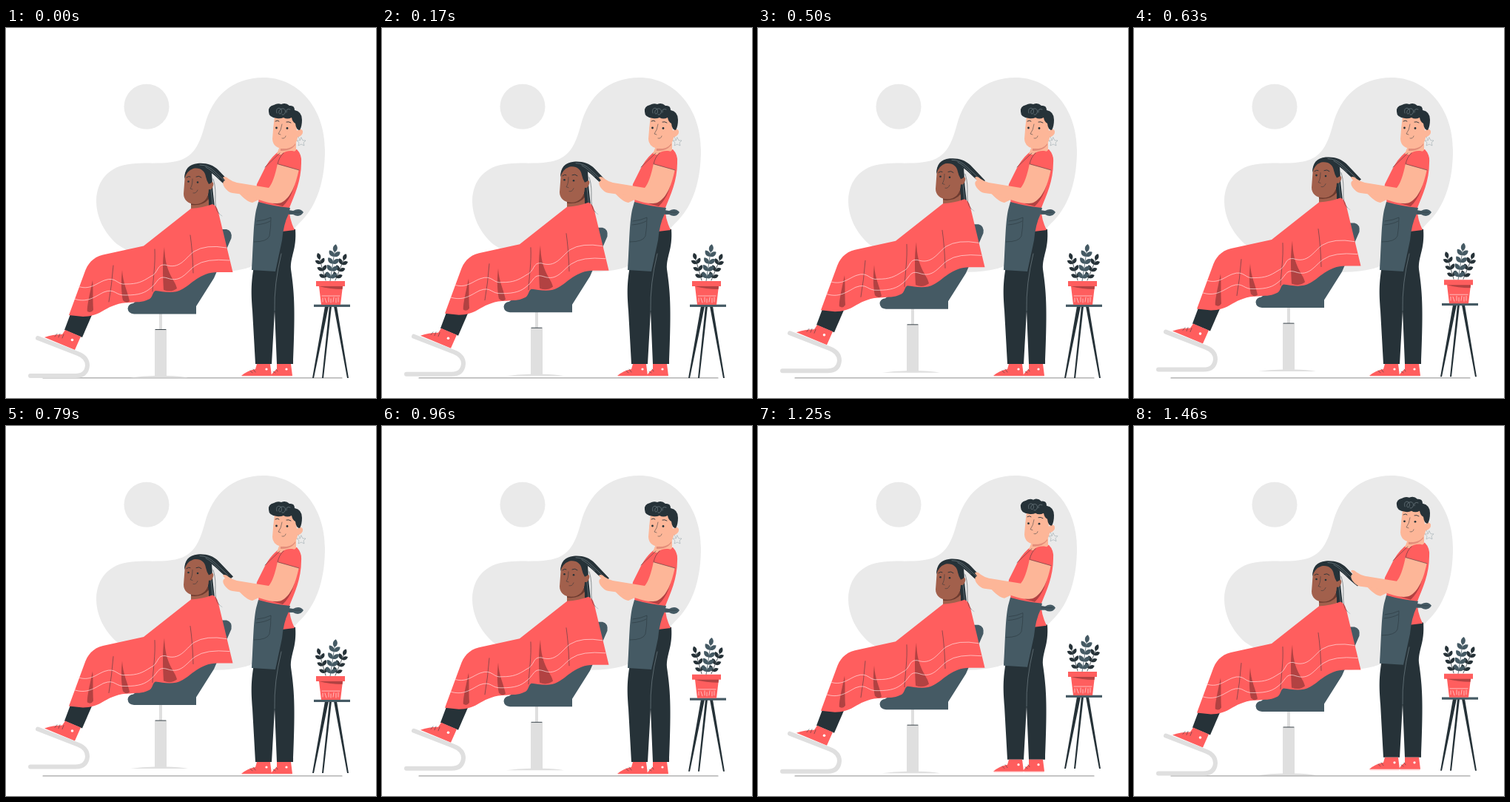
Animation, 500 px wide and 500 px high, one loop 1.5 s. Source, as an HTML page:

```html
<!DOCTYPE html>
<html lang="en">
<head>
<meta charset="utf-8">
<style>
html, body { margin: 0; width: 100%; height: 100%; overflow: hidden; background: #fff; }
svg { display: block; width: 100%; height: 100%; }
path { stroke-linecap: round; stroke-linejoin: round; }
.red { fill: #ff5e5e; }
.deep { fill: #b24242; }
.dark { fill: #263238; }
.slate { fill: #455a64; }
.skin { fill: #fdb698; }
.brown { fill: #a2604c; }
.pale { fill: #dfdfdf; }
.white { fill: #fff; }
.ink { fill: none; stroke: #263238; stroke-width: .9; }
.fine { fill: none; stroke: #263238; stroke-width: .5; }
.wave { fill: none; stroke: #ffe3e3; stroke-width: .7; }
.shine { fill: none; stroke: #91a0a7; stroke-width: .5; }
.sole { fill: none; stroke: #ffd5d5; stroke-width: 1.2; }
</style>
</head>
<body>
<svg viewBox="0 0 500 500">
  <g fill="#eaeaea">
    <circle cx="190" cy="106.300" r="30.500"/>
    <path d="M348 67C395 67 431 108 431 165C431 205 421 241 396 264C376 284 356 316 324 325C272 339 190 320 150 292C132 276 122 255 122 233C123 205 140 186 170 183.500C190 181.500 205 184 225 181C255 177 262 155 269 130C279 93 305 67 348 67Z"/>
  </g>
  <path d="M50 472.900H454" fill="none" stroke="#a4a4a4" stroke-width="1.200"/>

  <g id="client">
    <path class="pale" d="M168 472.500Q184 470 201 470H217Q234 470 246 472.500Z"/>
    <path class="pale" d="M207 385H211V408H207ZM201 407.500H217V472H201Z"/>
    <path class="ink" d="M202 407.500H216"/>
    <path class="slate" d="M288 272H298Q306 274 304.500 284L281 338L257 376V386.500H173Q165 386 164.500 379Q165 373 172 372L200 350Z"/>
    <path class="dark" d="M88 384L116 388L103 418L79 408Z"/>
    <path class="red" d="M52 418Q63 414 76 414L80 408L101 417L93 435Z"/>
    <path class="fine" d="M66 417L69 413M71 418L73 413M76 419L78 414"/>
    <circle class="white" cx="89.500" cy="421.500" r="1.800"/>
    <path d="M43 419L97 440Q110 445 110 456Q109 470 94 470H33" fill="none" stroke="#dfdfdf" stroke-width="6"/>

    <path class="brown" d="M250 228H274V240Q262 249 250 246Z"/>
    <path fill="#6d3b2f" d="M250 235Q266 236 274 224V231Q266 241 250 239Z"/>
    <path class="dark" d="M268 190L278 196Q279 220 282 242H274Q275 225 268 210Z"/>
    <path class="red" d="M250 244Q266 243 279 238Q285 240 287 249L306.500 330H286C262 330 250 347 238 353C226 360 212 356 202 355C197 357 199 365 192 367C184 371 176 370 168 371C152 371 142 376 133 381C124 387 114 390 104 390L85 388L106 331C110 319 117 310 131 306.500L186 294.500Z"/>
    <g class="deep">
      <path d="M117 341C113 360 109 378 110 383Q115 386 118 381C117 365 118 350 117 341Z"/>
      <path d="M157 327C155 345 156 359 158 368Q163 373 167 369C164 355 158 345 157 327Z"/>
      <path d="M214 296C211 315 212 335 213 354Q223 358 231 352C229 340 215 333 214 296Z"/>
    </g>
    <path class="fine" d="M145 321Q143 347 139 370M201 299C202 320 199 335 198 356M249 280Q252 300 253 331"/>
    <path class="wave" d="M97 349C113 355 122 345 133 341C149 335 150 348 162 346C178 346 184 343 195 336C207 331 203 319 215 320C235 327 242 311 254 302Q270 292 298 297"/>
    <path class="wave" d="M92 366C110 372 120 363 132 357C148 351 147 362 162 361C180 361 188 358 196 351C206 343 205 334 218 338C237 345 244 329 256 321Q270 311 302 314"/>

    <path class="brown" d="M242 197C245 188 255 184 266 189C275 195 275 203 275 208C280 206 282 211 279 215Q278 219 274 218C274 231 266 238 256 238C246 238 240 232 240 224Z"/>
    <path class="dark" d="M241 204C241 191 247 184 259 183C270 182 280 185 287 192L307 213L302 217C290 208 284 200 276 195Q279 200 278 209L274 211Q271 206 270 201C269 193 262 188 253 190Q244 193 241 204Z"/>
    <path class="shine" d="M262 185Q273 185 282 194L300 211M270 188Q278 192 288 203M277 218L279 238"/>
    <path class="fine" d="M280 204C287 225 278 240 288 251"/>
    <path class="shine" d="M288 251L292 254"/>
    <path class="ink" d="M244 202Q247 199.500 249 201M257 201Q261 199 264 202"/>
    <path class="fine" d="M252 204Q252 213 249 217L252 218M253 223Q257 224 259 219"/>
    <circle class="dark" cx="246.500" cy="207.500" r="1.300"/>
    <circle class="dark" cx="259" cy="208.500" r="1.300"/>
  </g>

  <g id="stylist">
    <path class="dark" d="M335 322C330 350 332 365 333 382L337 454H359L363 382L366 454H388C391 380 390 360 385 326C384 308 393 300 391 272L365 265Z"/>
    <path class="shine" d="M372 305Q362 346 363 382"/>
    <path class="red" d="M318 470Q326 463 337 461L339 454H357L359 470ZM358 470Q361 464 366 461V454H385L387 470Z"/>
    <path class="sole" d="M319 471H358M360 471H386"/>
    <path class="fine" d="M330 463L333 466M334 461L337 465M361 464L364 466M365 461L367 464"/>
    <circle class="white" cx="352" cy="461" r="1.600"/>
    <circle class="white" cx="379" cy="461" r="1.600"/>

    <path class="skin" d="M309 218C318 226 325 235 333 236L346 230L340 215Z"/>
    <path class="red" d="M371 165L393 164Q400 171 399 182C399 207 390 225 383 243Q382 256 390 273L373 275L341 237C343 224 337 220 339 211L351 187Q360 172 371 165Z"/>
    <path class="deep" d="M392 196Q389 229 360 237L374 241Q391 224 392 196Z"/>
    <path class="skin" d="M372 155H392V165Q382 175 366 170Z"/>
    <path class="deep" d="M371 163Q382 164 391 154V158Q384 167 371 166Z" opacity=".35"/>
    <path class="fine" d="M350 188L370 169"/>

    <path class="skin" d="M367 183L396 190C392 211 385 230 372 236C360 240 339 232 329 226L306 223Q300 222 295 215Q291 208 296 206L293 202Q296 199 301 204Q305 207 312 209L355 216Q362 208 367 183Z"/>
    <path class="red" d="M373 170C380 164 394 164 398 174Q400 182 396 192L367 184Q369 175 373 170Z"/>
    <path class="fine" d="M367 184Q369 174 375 169M368 184L396 192"/>

    <path class="slate" d="M341 235Q362 241 384 243L382 251Q375 265 373 287L364 329L332 327C334 298 334 265 338 246Z"/>
    <path class="fine" d="M339 261Q350 260 358 256Q358 270 356 281Q353 289 335 289M338 266Q350 265 357 261"/>
    <path class="slate" d="M382 246L388 247Q397 242 402 249Q397 257 388 252L382 252Z"/>
    <path class="fine" d="M383 249H398"/>

    <path class="skin" d="M363 119H391L393 139Q398 134 401 139Q402 145 394 148Q392 161 379 163Q361 164 360 150Q361 134 363 119Z"/>
    <path class="dark" d="M366 122Q355 121 355 113Q354 106 362 104Q367 101 372 103Q378 100 383 105Q390 104 390 111Q400 113 400 124Q400 133 397 138Q392 138 391 129Q387 127 386 121Q380 124 375 121Q371 123 366 122Z"/>
    <path class="shine" d="M366 115C363 105 375 107 372 115C368 119 367 110 373 109C380 108 378 119 373 117M379 114Q378 108 384 110"/>
    <path class="ink" d="M364 126Q367 124 369 126M379 127Q382 126 385 128"/>
    <path class="fine" d="M373 130Q372 138 368 143L371 144M373 149Q377 150 378 146"/>
    <circle class="dark" cx="365.500" cy="135" r="1.400"/>
    <circle class="dark" cx="380" cy="135.500" r="1.400"/>
    <path class="shine" d="M395 147L397 151M399 148L401 152L405 152L402 155L403 159L399 157L395 159L396 155L393 152L397 152Z"/>
  </g>

  <g id="plant">
    <path class="dark" d="M431 376H436L416 473H414ZM437 376H440L429 473H427ZM443 376H447L463 473H461Z"/>
    <rect class="slate" x="416" y="373.700" width="49" height="3.200"/>
    <g id="leaves"></g>
    <path class="red" d="M419 342H458V349H455L452 374H426L423 349H419Z"/>
    <path class="deep" d="M423 349H455L454.500 353Q438 353 423 349Z"/>
    <path class="wave" d="M427 362H451M428 365V370M431 365L433 371M436 364V370M439 366V371M443 364L442 370M446 365V371M449 364V370"/>
  </g>
</svg>
<script>
const PERIOD = 1500, RISE = 10;
const byId = id => document.getElementById(id);

// A stem with paired leaves along it and one at the tip.
function stem(x0, y0, x1, y1, pairs, size, color) {
  const lean = Math.atan2(x1 - x0, y0 - y1) * 180 / Math.PI;
  const leaf = (x, y, turn, s) => `<path fill="${color}" transform="translate(${x} ${y}) rotate(${turn}) scale(${s})"
    d="M0 0C-4 -3 -4 -8 0 -11C4 -8 4 -3 0 0Z"/>`;
  let out = `<path d="M${x0} ${y0}L${x1} ${y1}" stroke="${color}" stroke-width=".8"/>` + leaf(x1, y1, lean, size);
  for (let i = 0; i < pairs; i++) {
    const k = (i + .4) / pairs, x = x0 + (x1 - x0) * k, y = y0 + (y1 - y0) * k;
    for (const side of [-1, 1]) out += leaf(x, y, lean + side * 45, size * .95);
  }
  return out;
}
byId('leaves').innerHTML =
  stem(432, 341, 424, 313, 3, .85, '#263238') +
  stem(445, 341, 456, 314, 3, .85, '#263238') +
  stem(438, 342, 444, 303, 4, 1, '#455a64');

const floaters = [['client', 0], ['plant', 500], ['stylist', 1000]]
  .map(([id, delay]) => ({ node: byId(id), delay }));

function draw(now) {
  const t = now % PERIOD;
  for (const { node, delay } of floaters) {
    const p = Math.max(0, t - delay) / PERIOD;
    const y = -RISE * (1 - Math.abs(1 - 2 * p));
    node.setAttribute('transform', `translate(0 ${y.toFixed(2)})`);
  }
}
const start = performance.now();
function tick() {
  draw(performance.now() - start);
  requestAnimationFrame(tick);
}
tick();
</script>
</body>
</html>
```
